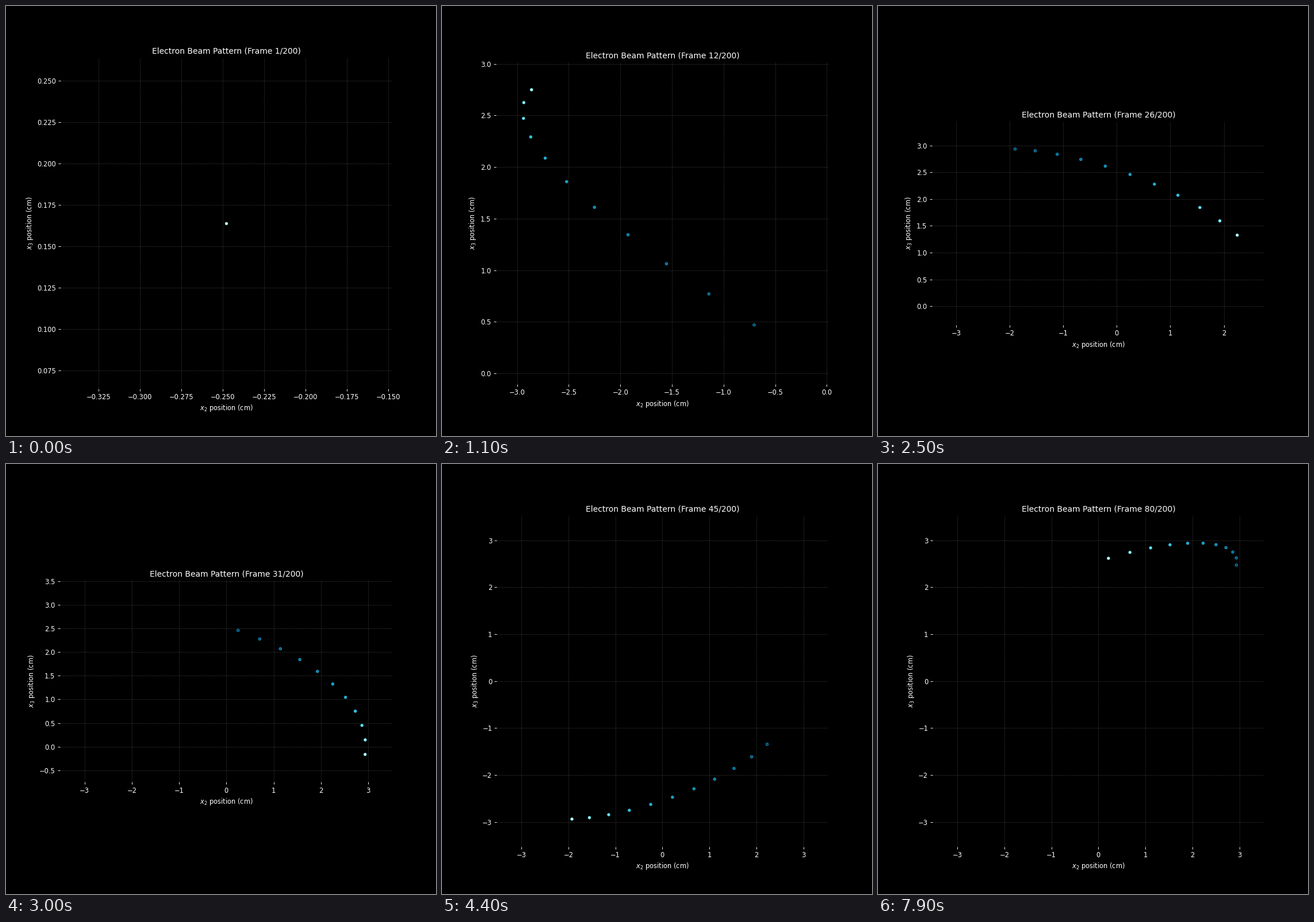
Write a matplotlib script that moves like this. It is 748 by 748 pixels and loops after 8 s.

```python
import numpy as np
import matplotlib.pyplot as plt
from matplotlib.animation import FuncAnimation
from matplotlib.colors import LinearSegmentedColormap

SIZE = 748
INCHES = 9
FRAMES = 80
TOTAL = 200
TRAIL = 11

plt.style.use("dark_background")
plt.rcParams["font.family"] = "DejaVu Sans"

# Beam path: a 3:2 Lissajous figure
n = np.arange(FRAMES)
path = np.column_stack([
    -2.946 * np.sin(np.pi / 20 * (n + 0.536)),
    2.940 * np.sin(np.pi / 30 * (n + 0.5326)),
])

# Phosphor glow, from faded (0) to fresh (1)
core = LinearSegmentedColormap.from_list(
    "core", [(0, "#06405c"), (0.4, "#1485ae"), (0.7, "#35c4dc"),
             (0.88, "#a0f8fa"), (1, "#ffffff")])
rim = LinearSegmentedColormap.from_list(
    "rim", [(0, "#0c93c8"), (0.6, "#1fb0d8"), (1, "#70f8ff")])

fig, ax = plt.subplots(figsize=(INCHES, INCHES), dpi=SIZE / INCHES)
fig.set_facecolor("black")
ax.set_facecolor("black")
ax.set_aspect("equal")
ax.set_xlabel("$x_2$ position (cm)")
ax.set_ylabel("$x_3$ position (cm)")
ax.grid(True, color="gray", linestyle="--", linewidth=0.5, alpha=0.5)
ax.spines[:].set_visible(False)
beam = ax.scatter([], [], s=15, linewidths=0.8, zorder=3)


def fit_view(points):
    low, high = points.min(axis=0), points.max(axis=0)
    margin = 0.1 * ((high - low).max() or 1)
    ax.set_xlim(low[0] - margin, high[0] + margin)
    ax.set_ylim(low[1] - margin, high[1] + margin)


def update(i):
    seen = path[:i + 1]
    tail = seen[-TRAIL:]
    glow = 1 - np.arange(len(tail))[::-1] / (TRAIL - 1)
    beam.set_offsets(tail)
    beam.set_facecolor(core(glow))
    beam.set_edgecolor(rim(glow))
    fit_view(seen)
    ax.set_title(f"Electron Beam Pattern (Frame {i + 1}/{TOTAL})")
    return beam,


anim = FuncAnimation(fig, update, frames=FRAMES, interval=100,
                     repeat=True, repeat_delay=0, blit=False)
plt.show()
```
